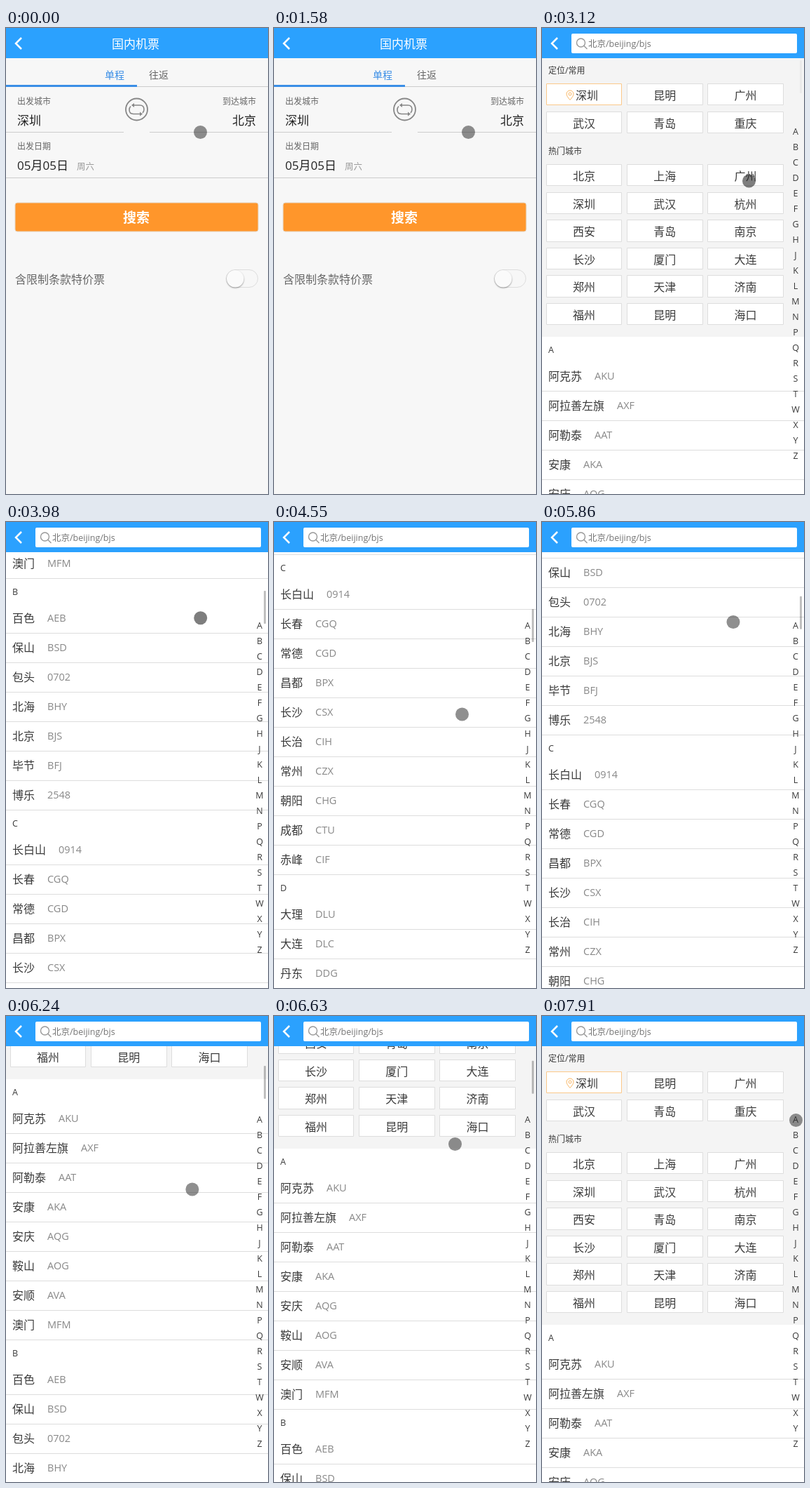
These frames come from a looping animation (374 px wide and 664 px high, 8 s). An HTML page with a canvas:

```html
<!DOCTYPE html>
<html lang="zh-CN">
<head>
<meta charset="utf-8">
<title>国内机票</title>
<style>
html, body { margin: 0; width: 100%; height: 100%; overflow: hidden; }
canvas { display: block; }
</style>
</head>
<body>
<canvas width="374" height="664"></canvas>
<script>
const W = 374, H = 664, LOOP = 8000, LIST_AT = 2730;
const FONT = '"Open Sans", "Noto Sans CJK SC", "Noto Sans CJK", sans-serif';
const BLUE = '#2ba1fe', INK = '#3a3a3a', LINE = '#ddd';
const c = document.querySelector('canvas').getContext('2d');

const COMMON = '深圳 昆明 广州 武汉 青岛 重庆'.split(' ');
const HOT = ('北京 上海 广州 深圳 武汉 杭州 西安 青岛 南京 ' +
  '长沙 厦门 大连 郑州 天津 济南 福州 昆明 海口').split(' ');
const SECTIONS = {
  A: '阿克苏 AKU,阿拉善左旗 AXF,阿勒泰 AAT,安康 AKA,安庆 AQG,鞍山 AOG,安顺 AVA,澳门 MFM',
  B: '百色 AEB,保山 BSD,包头 0702,北海 BHY,北京 BJS,毕节 BFJ,博乐 2548',
  C: '长白山 0914,长春 CGQ,常德 CGD,昌都 BPX,长沙 CSX,长治 CIH,常州 CZX,朝阳 CHG,成都 CTU,赤峰 CIF',
  D: '大理 DLU,大连 DLC,丹东 DDG,稻城 DCY,德宏 LUM,迪庆 DIG,东营 DOY,敦煌 DNH',
  E: '鄂尔多斯 DSN,恩施 ENH,额济纳旗 EJN'
};

// Three flicks down the list, then three back up
const FLICKS = 3, PERIOD = 735, DOWN_AT = 3120, UP_AT = 5220;
const LAST = 1425, STEP_DOWN = 547.5, STEP_UP = 587;

// Where the pointer rests between flicks: time, x, y
const REST = [
  [20, 277.5, 148.5], [1580, 277.5, 148.5], [2020, 310, 128], [LIST_AT, 310, 128],
  [3100, 295.5, 218], [4550, 268.5, 274], [5110, 273, 142.5], [5860, 273, 142.5],
  [6630, 258.5, 182.5], [7640, 350, 143], [7910, 362.5, 148.5]
];

const clamp = v => Math.min(1, Math.max(0, v));
const mix = (a, b, p) => a + (b - a) * p;
const smooth = p => p * p * (3 - 2 * p);
const glide = p => 1 - (1 - p ** 1.2) ** 3;

function flickAt(t) {
  const up = t >= UP_AT;
  const n = (t - (up ? UP_AT : DOWN_AT)) / PERIOD;
  const i = Math.floor(n);
  return { up, i, p: n - i, active: n >= 0 && n < FLICKS };
}

function scrollAt(t) {
  const { up, i, p, active } = flickAt(t);
  if (!active) return 0;
  const stop = k => up ? Math.max(0, LAST - STEP_UP * k) : Math.min(LAST, STEP_DOWN * k);
  return Math.round(mix(stop(i), stop(i + 1), glide(clamp((p * PERIOD - 40) / 480))));
}

function pointerAt(t) {
  const next = REST.findIndex(k => k[0] > t);
  const b = REST[next < 0 ? REST.length - 1 : next];
  const a = REST[next - 1] || b;
  const q = a === b || next < 0 ? 1 : smooth((t - a[0]) / (b[0] - a[0]));
  const { up, p, active } = flickAt(t);
  const swing = active ? smooth(clamp(p / 0.2)) * (1 - smooth(clamp((p - 0.2) / 0.5))) : 0;
  return {
    x: mix(a[1], b[1], q),
    y: mix(a[2], b[2], q) + (up ? 125 : -125) * swing,
    pressed: active && p < 0.2 || t >= 2300 && t < 2350
  };
}

function rect(x, y, w, h, color) {
  c.fillStyle = color;
  c.fillRect(x, y, w, h);
}

function rounded(x, y, w, h, r, fill, line) {
  c.beginPath();
  c.roundRect(x, y, w, h, r);
  c.fillStyle = fill;
  c.fill();
  if (line) stroke(line, 1);
}

function stroke(color, width, path) {
  c.strokeStyle = color;
  c.lineWidth = width;
  path ? c.stroke(new Path2D(path)) : c.stroke();
}

// y is the visual middle of the line
function text(s, x, y, size, color, align = 'left', weight = 400) {
  c.font = `${weight} ${size}px ${FONT}`;
  c.textAlign = align;
  c.fillStyle = color;
  c.fillText(s, x, y + size * 0.37);
}

function header() {
  rect(0, 0, W, 43, BLUE);
  stroke('#fff', 2.5, 'M22 14L14 22L22 30');
}

function searchPage() {
  rect(0, 0, W, H, '#f7f7f7');
  header();
  text('国内机票', 185, 23, 17, '#fff', 'center');

  text('单程', 155, 67, 14, '#3a8ee6', 'center');
  text('往返', 218, 67, 14, '#666', 'center');
  rect(0, 83, W, 1, '#ccc');
  rect(0, 81, 187, 3, '#3a8ee6');

  text('出发城市', 16, 105, 12, '#666');
  text('到达城市', 357, 105, 12, '#666', 'right');
  text('深圳', 16, 132, 17, '#222');
  text('北京', 357, 132, 17, '#222', 'right');
  rect(0, 148, 168, 1, '#ccc');
  rect(205, 148, 169, 1, '#ccc');

  c.beginPath();
  c.arc(186.5, 116, 15.5, 0, 7);
  stroke('#888', 1.8);
  stroke('#888', 1.6, 'M180 110H191Q197 110 197 116Q197 119 195 121' +
    'M193 122.5H182Q176 122.5 176 116.5Q176 113.5 178 111.5');
  c.fillStyle = '#888';
  c.fill(new Path2D('M179 110L183 107V113ZM195 122.5L191 119.5V125.5Z'));

  text('出发日期', 16, 169, 12, '#666');
  text('05月05日', 16, 196, 17, '#222');
  text('周六', 101, 197, 12.5, '#999');
  rect(0, 213, W, 1, '#ccc');

  rounded(13, 249, 347, 41, 3, '#ff962b', '#e6d5c0');
  text('搜索', 186, 270, 19, '#fff', 'center', 700);

  text('含限制条款特价票', 13, 358, 16, '#666');
  rounded(314.5, 344.5, 45, 25, 12.5, '#f7f7f7', LINE);
  c.save();
  c.shadowColor = 'rgba(0,0,0,.4)';
  c.shadowBlur = 2;
  c.shadowOffsetY = 1;
  rounded(315, 345, 24.5, 24.5, 12.25, '#fafafa');
  c.restore();
}

function cityGrid(names, top) {
  names.forEach((name, i) => {
    const left = 5.5 + 115.3 * (i % 3), y = top + 39.6 * Math.floor(i / 3);
    const x0 = Math.round(left), x1 = Math.round(left + 108.8);
    const y0 = Math.round(y), y1 = Math.round(y + 31.4);
    const pinned = names === COMMON && !i;
    rounded(x0 + 0.5, y0 + 0.5, x1 - x0 - 1, y1 - y0 - 1, 0, '#fff', pinned ? '#fbc98a' : LINE);
    if (pinned) {
      stroke('#f9b765', 1, 'M40 102.5Q35 97 35 94A5 5 0 0 1 45 94Q45 97 40 102.5Z' +
        'M38 94A2 2 0 0 0 42 94A2 2 0 0 0 38 94');
    }
    text(name, pinned ? 64 : left + 54.5, y0 + 17, 16, INK, 'center');
  });
}

function cityList() {
  let y = 458;
  for (const [letter, rows] of Object.entries(SECTIONS)) {
    text(letter, 9, y, 12.5, INK);
    y += 38;
    for (const row of rows.split(',')) {
      const [name, code] = row.split(' ');
      text(name, 9, y, 16, INK);
      text(code, 27 + 16 * name.length, y, 14.5, '#888');
      rect(0, y + 21, W, 1, LINE);
      y += 42;
    }
    y -= 2;
  }
}

function cityPage(t) {
  const scroll = scrollAt(t);
  rect(0, 0, W, H, '#fff');
  c.save();
  c.translate(0, -scroll);
  rect(0, 43, W, 397, '#f4f4f4');
  text('定位/常用', 9, 61, 12, INK);
  cityGrid(COMMON, 79);
  text('热门城市', 9, 176, 12, INK);
  cityGrid(HOT, 194);
  cityList();
  c.restore();

  [...'ABCDEFGHJKLMNPQRSTWXYZ'].forEach((letter, i) =>
    text(letter, 362, 147.5 + 22 * i, 12.5, INK, 'center'));

  const alpha = clamp((t - 3080) / 250) * clamp((7610 - t) / 300);
  rounded(368, 46 + scroll * 0.0712, 3, 47, 1, `rgba(0,0,0,${0.25 * alpha})`);

  header();
  rounded(42, 8, 322, 28, 2, '#fff');
  c.beginPath();
  c.arc(55.5, 21, 6, 0, 7);
  stroke('#999', 1.4);
  stroke('#999', 1.4, 'M60 25.5L64.5 30');
  text('北京/beijing/bjs', 66, 22, 12.5, '#757575');
}

function pointer(t) {
  const { x, y, pressed } = pointerAt(t);
  c.beginPath();
  c.arc(x, y, 9.5, 0, 7);
  c.fillStyle = `rgba(40,40,40,${pressed ? 0.6 : 0.52})`;
  c.fill();
}

const start = performance.now();
function draw() {
  const t = (performance.now() - start) % LOOP;
  t < LIST_AT ? searchPage() : cityPage(t);
  pointer(t);
  requestAnimationFrame(draw);
}
draw();
</script>
</body>
</html>
```
